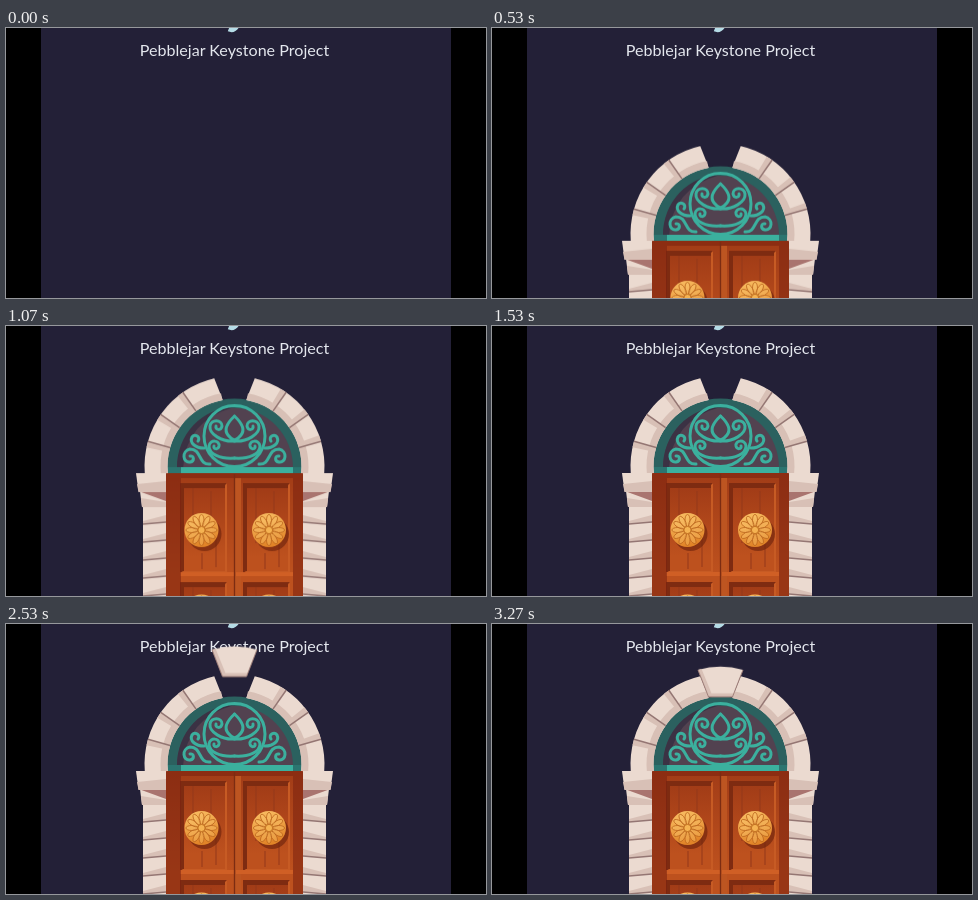
These frames come from a looping animation (480x270 px, 3340 ms). An HTML page:

```html
<!DOCTYPE html>
<html lang="en">
<head>
<meta charset="utf-8">
<title>Door</title>
<style>
  html, body { margin: 0; width: 100%; height: 100%; overflow: hidden; background: #000; }
  svg { display: block; width: 480px; height: 270px; }
  text { font: 16.1px Lato, "Open Sans", sans-serif; fill: #e4e7ee; text-anchor: middle; }
  #door, #key { animation: 3340ms infinite; }
  #door { animation-name: rise; }
  #key { animation-name: drop; }
  /* this bezier is an exact quadratic ease-out */
  @keyframes rise {
    0% { transform: translateY(248px); animation-timing-function: cubic-bezier(.3333, .6667, .6667, 1); }
    32.78%, 100% { transform: none; }
  }
  @keyframes drop {
    0%, 47.9% { transform: translateY(-94.4px); animation-timing-function: cubic-bezier(.3333, .6667, .6667, 1); }
    100% { transform: none; }
  }
  .light { fill: #ebdad0; }
  .mid { fill: #d8c0b6; }
  .dark { fill: #a9746f; }
  .seam { stroke: #947673; stroke-width: 1.5; fill: none; }
  .scroll { fill: none; stroke: #3bb09e; stroke-width: 3; stroke-linecap: round; }
</style>
</head>
<body>
<svg viewBox="0 0 480 270">
  <defs>
    <clipPath id="stage"><rect x="35" width="410" height="270"/></clipPath>
    <linearGradient id="wood" x2="0" y2="1">
      <stop stop-color="#a23c17"/>
      <stop offset=".8" stop-color="#bd511e"/>
    </linearGradient>
    <linearGradient id="gold" x2=".3" y2="1">
      <stop stop-color="#fbc267"/>
      <stop offset="1" stop-color="#e18428"/>
    </linearGradient>
    <g id="pillar">
      <path class="light" d="M137 180H160V272H137Z"/>
      <g id="blocks"></g>
      <path class="light" d="M134 165H160V181H136Z"/>
      <path class="mid" d="M135 172L160 176V181H136Z"/>
      <path class="dark" d="M134 165.5H160V175Z"/>
      <path class="light" d="M130 147H160V165.5H132.5Z"/>
      <path class="mid" d="M131 158L160 155V166H132.5Z"/>
    </g>
    <g id="scrolls" class="scroll">
      <path d="M228.5 90C221 97 218 104 222 109Q225 113 228.5 114"/>
      <path d="M228.5 115C216 116 203 108 204 100C205 93 216 93 216 100C215 105 209 104 210 100"/>
      <path d="M228.5 132C214 133 203 128 203 120C204 113 214 114 213 120C212 124 207 123 208 120"/>
      <path d="M204 138C192 139 196 123 184 123C175 125 177 137 184 136C189 135 188 129 184 130"/>
      <path d="M198 122C190 122 183 117 186 111C189 107 195 111 192 115"/>
    </g>
    <g id="knob">
      <circle cx="3" cy="4" r="17" fill="#6f240d" fill-opacity=".65"/>
      <circle r="17" fill="url(#gold)"/>
      <g id="petals" fill="#ffd27c" fill-opacity=".3" stroke="#bd681f" stroke-width=".8"></g>
      <circle r="3.6" fill="#f5b352" stroke="#c47424"/>
    </g>
    <g id="panel">
      <path d="M0 0H47V90H0Z" fill="#7e2b11"/>
      <path d="M4 5H47V90H4Z" fill="url(#wood)"/>
      <path d="M47 0V90H0L3 88H45V2Z" fill="#c75b24"/>
      <path d="M13 5V60M31 8V40M22 70V86M36 52V84" stroke="#93391a" fill="none"/>
    </g>
  </defs>

  <g clip-path="url(#stage)">
    <rect x="35" width="410" height="270" fill="#232037"/>
    <path d="M222.5 1.5Q229 4 232.5 -4" fill="none" stroke="#b5dce6" stroke-width="4"/>
    <text x="228.5" y="27.5">Pebblejar Keystone Project</text>

    <g id="door">
      <path d="M161 148V140A67.5 67.5 0 0 1 296 140V148Z" fill="#2b615f"/>
      <path d="M171 142A58 60 0 0 1 287 142Z" fill="#524250"/>
      <path d="M171 142A58 60 0 0 1 228.5 81Q180 94 177 142Z" fill="#3b3244"/>
      <circle class="scroll" cx="228.5" cy="110" r="30.5"/>
      <use href="#scrolls"/>
      <use href="#scrolls" transform="translate(457) scale(-1 1)"/>
      <path d="M161 141H296V147H161Z" fill="#2b7570"/>
      <path d="M175 141H287V147H175Z" fill="#3bb09e"/>

      <path d="M160 147H297V272H160Z" fill="url(#wood)"/>
      <path d="M229 152H235V272H229Z" fill="#bd5521"/>
      <use href="#panel" x="174" y="157"/>
      <use href="#panel" x="237" y="157"/>
      <path d="M174 248H228M230 248H287" stroke="#d05f25" stroke-width="4"/>
      <use href="#panel" x="174" y="256"/>
      <use href="#panel" x="237" y="256"/>
      <path d="M160 147H297V272H287V152H175V272H160Z" fill="#7a2210" fill-opacity=".55"/>
      <path d="M228.5 148V272" stroke="#7c2c12" stroke-width="1.3"/>
      <use href="#knob" x="195.5" y="204"/>
      <use href="#knob" x="263" y="204"/>
      <use href="#knob" x="195.5" y="285.5"/>
      <use href="#knob" x="263" y="285.5"/>

      <g id="arch"></g>
      <use href="#pillar"/>
      <use href="#pillar" transform="translate(457) scale(-1 1)"/>
    </g>

    <g id="key">
      <path class="light" d="M206 46Q228.5 39.5 251 46L240.5 73H216.5Z"/>
      <path class="mid" d="M206 46L209.5 45L219.5 69.5H242L240.5 73H216.5Z"/>
      <path d="M206 46L216.5 73H240.5L251 46" fill="none" stroke="#a07f79"/>
    </g>
  </g>
</svg>
<script>
  const NS = "http://www.w3.org/2000/svg";
  const add = (id, tag, attrs) => {
    const el = document.createElementNS(NS, tag);
    for (const k in attrs) el.setAttribute(k, attrs[k]);
    document.getElementById(id).append(el);
  };
  const polar = (r, deg) => {
    const a = deg * Math.PI / 180;
    return (228.5 + r * Math.cos(a)).toFixed(2) + " " + (140 - r * Math.sin(a)).toFixed(2);
  };
  // ring sector; the inner edge may span different angles
  const sector = (r0, r1, from, to, inFrom = from, inTo = to) =>
    `M${polar(r1, from)}A${r1} ${r1} 0 0 0 ${polar(r1, to)}` +
    `L${polar(r0, inTo)}A${r0} ${r0} 0 0 1 ${polar(r0, inFrom)}Z`;

  const outer = 90, inner = 67;
  const stone = (cls, d) => add("arch", "path", { class: cls, d });
  stone("light", sector(inner, outer, 103, 184.5, 100, 186));
  stone("light", sector(inner, outer, -4.5, 77, -6, 80));
  stone("mid", sector(inner, 74, 100.5, 186));
  stone("mid", sector(inner, 74, -6, 79.5));
  for (const a of [16, 35, 55, 125, 145, 164]) {
    stone("mid", sector(inner, outer, a, a + 4));
    stone("seam", `M${polar(inner, a)}L${polar(outer, a)}`);
  }
  for (let y = 198; y < 272; y += 18) {
    add("blocks", "path", { class: "mid", d: `M137 ${y - 3}L160 ${y - 9}V${y - 2}L137 ${y}Z` });
    add("blocks", "path", { class: "seam", d: `M137 ${y}L160 ${y - 2}` });
  }
  for (let i = 0; i < 12; i++)
    add("petals", "ellipse", { cy: -9.6, rx: 2.5, ry: 6, transform: `rotate(${i * 30})` });
</script>
</body>
</html>
```
